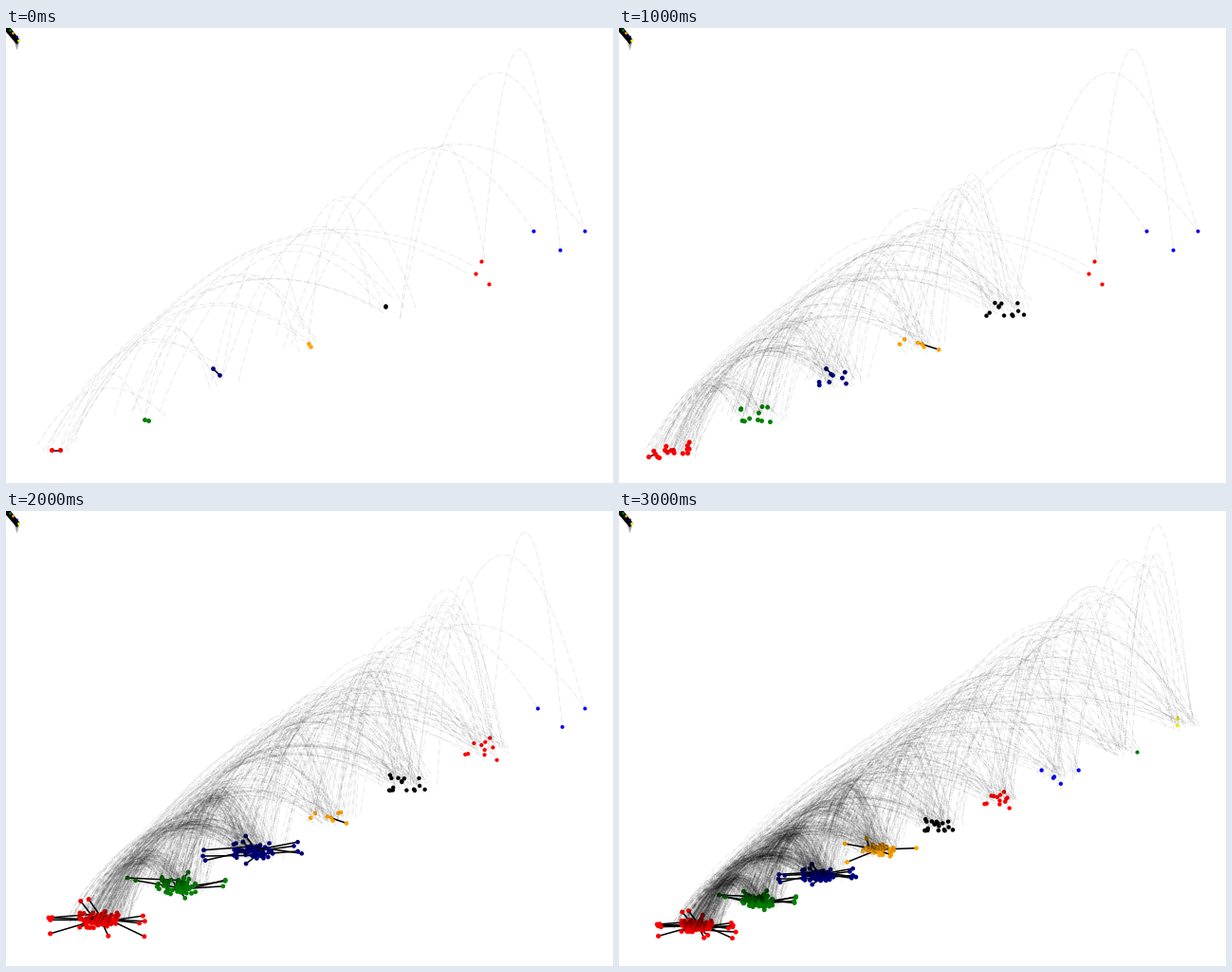
Write a matplotlib script that moves like this. It is 640 px wide and 480 px high and loops after 3500 ms.

```python
from itertools import combinations

import numpy as np
import matplotlib.pyplot as plt
from matplotlib.animation import FuncAnimation
from matplotlib.collections import LineCollection
from matplotlib.patches import Polygon

W, H, DPI = 640, 480, 100
STEPS, STEP_MS = 7, 500
rng = np.random.default_rng(12)

COLORS = ["red", "green", "navy", "orange", "black", "red", "blue", "green", "#f8f020"]
LAYERS = len(COLORS)

# View per step: x scale, x shift, y scale, y shift
FULL = (1, 0, 1, 0)
MID = (.92, 48.8, .969, .6)
WIDE = (.723, 43.1, .714, 120.2)
VIEWS = [FULL] * 4 + [MID, WIDE, WIDE]

# Key points of each layer; the last two layers join late
KEYS = [
    [(48, 445), (57, 445)],
    [(146, 413), (150, 414)],
    [(218, 359), (225, 366)],
    [(319, 333), (321, 336)],
    [(400, 293), (400, 294)],
    [(501, 246), (495, 259), (509, 270)],
    [(556, 214), (584, 234), (610, 214)],
    [(695, 186)],
    [(754, 138), (754, 148)],
]
LATE_LAYER, LATE_STEP = 7, 5

# Points that join each layer, by step, counted from the first layer
JOINING = {1: [1, 1, 2, 4, 10], 2: [14, 8, 5], 3: [6, 2, 5, 2, 4, 7],
           4: [55, 42, 42], 5: [0, 0, 0, 0, 3, 3, 2], 6: [15, 22, 14, 30]}
SPOKES = {3: [0, 0, 1], 4: [11, 7, 8], 6: [6, 3, 2, 4]}
LINKED = [(0, 0), (0, 2), (1, 3), (2, 0), (3, 0)]  # step, layer

# Lone arcs on the right: start, end, rise
LONE_ARCS = [((502, 246), (584, 234), 218), ((415, 306), (610, 214), 211),
             ((415, 306), (505, 246), 152), ((300, 334), (610, 214), 146),
             ((292, 337), (556, 214), 143)]

# Per step: layers that arcs reach, arcs per pair of layers
ARC_ENDS = {0: (range(1, 5), 2), 1: (range(1, 5), 7), 2: (range(1, 3), 17),
            3: (range(1, 6), 9), 4: (range(1, 3), 55), 5: (range(6, 9), 5),
            6: (range(1, 4), 38)}


def center(layer):
    return np.array([53 + 88.5 * layer, 444 - 37.2 * layer])


def project(points, view):
    sx, ox, sy, oy = view
    return np.asarray(points, float) * (sx, sy) + (ox, oy)


def near(layer, dx, dy):
    return center(layer) + np.clip(rng.normal(size=2), -2, 2) * (dx, dy)


def arc(start, end, rise):
    t = np.linspace(0, 1, 45)[:, None]
    start, end = np.asarray(start), np.asarray(end)
    lift = np.array([.03 * (end[0] - start[0]), rise])
    return start + (end - start) * t - lift * 4 * t * (1 - t)


def random_arc(a, b):
    start, end = near(a, 17, 5), near(b, 14, 5)
    rise = 12 + .19 * (start[0] + end[0])
    return arc(start, end, rise * rng.uniform(.85, 1.07))


def joining_points(layer, step, count):
    if step < 4:
        return [center(layer) + rng.uniform(-1, 1, 2) * (23, 9) for _ in range(count)]
    return [near(layer, 11, 4.5) for _ in range(count)]


def spoke_tip(layer, k):
    """Most spokes point sideways, every third one up or down."""
    side = 1 if k % 2 == 0 else -1
    if k % 3 == 2:
        offset = (rng.uniform(-22, 22), -side * rng.uniform(13, 23))
    else:
        offset = (side * rng.uniform(46, 58), rng.normal(1, 7))
    return center(layer) + offset


def build_nodes():
    nodes, links = {}, []
    for layer, points in enumerate(KEYS):
        nodes[layer, LATE_STEP if layer >= LATE_LAYER else 0] = list(points)
    for step, counts in JOINING.items():
        for layer, count in enumerate(counts):
            nodes.setdefault((layer, step), []).extend(joining_points(layer, step, count))
    for step, layer in LINKED:
        first, *rest = nodes[layer, step]
        links.append((step, [first, min(rest, key=lambda p: np.hypot(*np.subtract(p, first)))]))
    for step, counts in SPOKES.items():
        for layer, count in enumerate(counts):
            for k in range(count):
                tip = spoke_tip(layer, k)
                nodes[layer, step].append(tip)
                links.append((step, [tip, near(layer, 7, 3)]))
    return nodes, links


def build_arcs():
    arcs = [(0, arc(*lone)) for lone in LONE_ARCS]
    for step, (ends, count) in ARC_ENDS.items():
        for a, b in combinations(range(LAYERS), 2):
            if b in ends:
                arcs += [(step, random_arc(a, b)) for _ in range(count)]
    arcs += [(0, random_arc(0, 5)) for _ in range(2)]
    return arcs


nodes, links = build_nodes()
arcs = build_arcs()
fig = plt.figure(figsize=(W / DPI, H / DPI), dpi=DPI, facecolor="white")
ax = fig.add_axes([0, 0, 1, 1])


def shown(lines, step):
    return [project(line, VIEWS[step]) for first, line in lines if first <= step]


def corner():
    """Tiny copy of the graph in the top left corner."""
    ax.add_patch(Polygon([(8, 13), (14, 13), (11, 23)], color="0.65", lw=0, zorder=4))
    ax.add_patch(Polygon([(-1, -1), (4, -1), (14, 12), (11, 17), (-1, 3)],
                         color="black", lw=0, zorder=5))
    ax.scatter([4, 7, 11, 13], [2, 5, 9, 13], s=4, lw=0, zorder=6,
               c=["green", "orange", "navy", "yellow"])


def draw(step):
    ax.clear()
    ax.set(xlim=(-.5, W - .5), ylim=(H - .5, -.5))
    ax.axis("off")
    ax.add_collection(LineCollection(shown(links, step), colors="black",
                                     linewidths=1.1, zorder=1))
    for (layer, first), points in nodes.items():
        if first <= step and points:
            x, y = project(points, VIEWS[step]).T
            size = (5.2 - 1.2 * x / 610) * 72 / DPI
            ax.scatter(x, y, s=size ** 2, c=COLORS[layer], lw=0, zorder=2)
    ax.add_collection(LineCollection(shown(arcs, step), colors="black", alpha=.085,
                                     linewidths=.7, linestyles="-.", zorder=3))
    corner()
    return []


anim = FuncAnimation(fig, draw, frames=STEPS, interval=STEP_MS,
                     init_func=lambda: [], repeat=True, repeat_delay=0)
plt.show()
```
